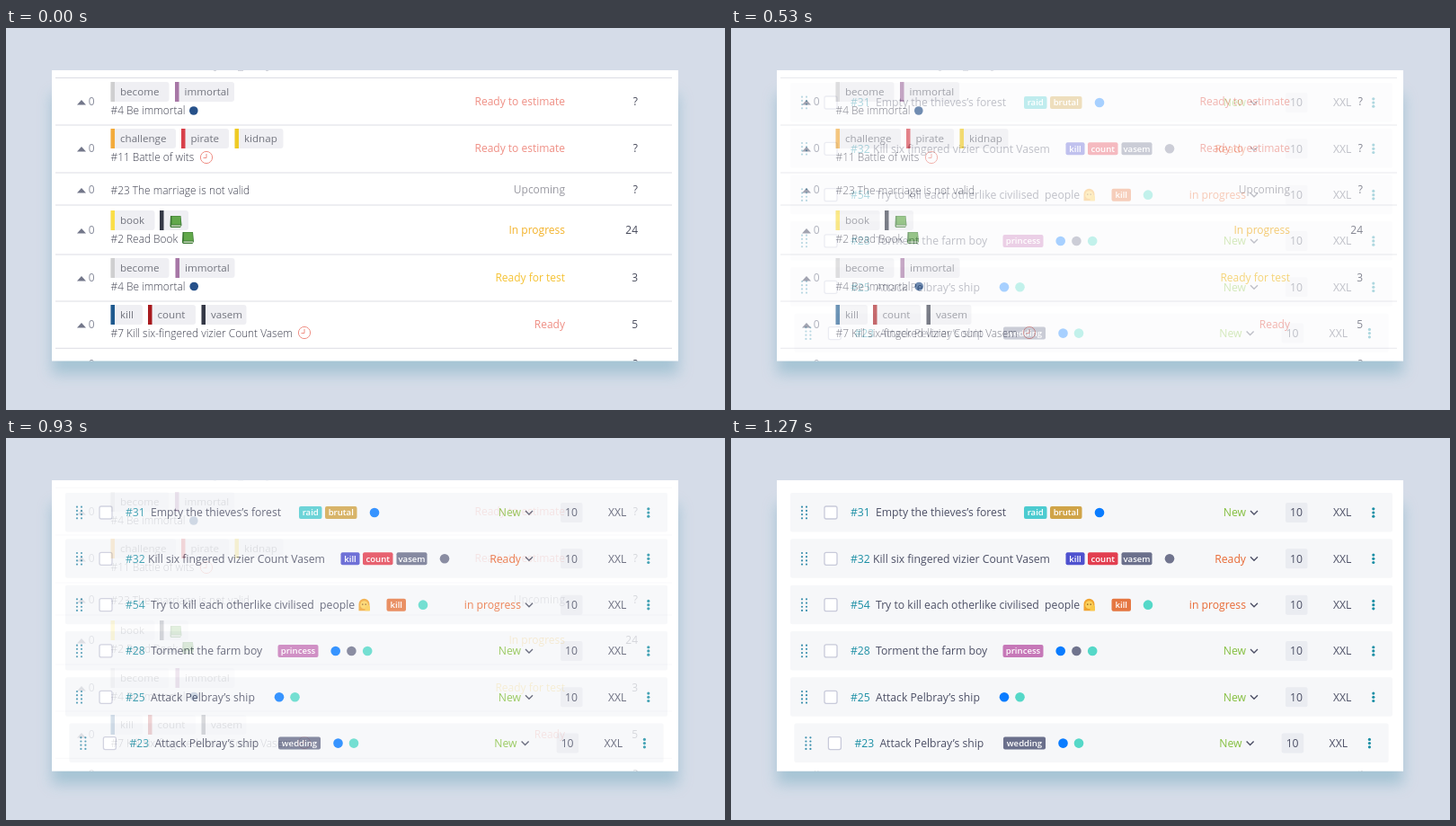
Animation, 800 px wide and 425 px high, one loop 5030 ms. Source, as an HTML page:

```html
<!DOCTYPE html>
<html lang="en">
<head>
<meta charset="utf-8">
<title>Backlog refresh</title>
<style>
  html, body { margin: 0; width: 100%; height: 100%; overflow: hidden; background: #d5dce8; }
  svg { display: block; width: 100%; height: 100%; font-family: "Open Sans", "Noto Sans", sans-serif; }
  .label { font-size: 11.6px; fill: #73757f; }
  .title { font-size: 11.9px; font-weight: 300; fill: #3f4150; }
  .state { font-size: 12px; }
  .story { font-size: 12.2px; fill: #4d5066; }
  .pill { font-size: 9.6px; font-weight: 600; fill: #fff; }
</style>
</head>
<body>
<svg viewBox="0 0 800 425">
  <defs>
    <filter id="soft" x="-10%" y="-20%" width="120%" height="140%"><feGaussianBlur stdDeviation="8"/></filter>
    <clipPath id="card"><rect x="51" y="47" width="697" height="323.5"/></clipPath>
  </defs>
  <rect width="800" height="425" fill="#d5dce8"/>
  <rect x="51" y="74" width="697" height="311" fill="#9cbfd0" opacity=".85" filter="url(#soft)"/>
  <g clip-path="url(#card)">
    <g id="before"></g>
    <g id="after"></g>
  </g>
</svg>
<script>
const LOOP = 5030, FADE_START = 30, FADE_END = 1270;
const CORAL = "#ef8f85", BLUE = "#0a7cff", GREY = "#70748e", TEAL = "#55d8c8",
      SLATE = "#6b708c", ORANGE = "#e86a35", GREEN = "#84bf3f", CYAN = "#1c8fa5";

const rect = (x, y, w, h, fill, r = 0, more = "") =>
  `<rect x="${x}" y="${y}" width="${w}" height="${h}" rx="${r}" fill="${fill}" ${more}/>`;
const dot = (x, y, r, fill) => `<circle cx="${x}" cy="${y}" r="${r}" fill="${fill}"/>`;
const path = (d, stroke, width = 1) =>
  `<path d="${d}" fill="none" stroke="${stroke}" stroke-width="${width}"/>`;
const text = (x, y, s, cls, fill, anchor = "start") =>
  `<text x="${x}" y="${y}" class="${cls}" text-anchor="${anchor}"${fill ? ` style="fill:${fill}"` : ""}>${s}</text>`;

const book = (x, y) =>
  `<g transform="translate(${x} ${y})">` +
  `<path d="M-6 -6H5.5L6.5 4.5L5 7H-5.5Q-7 6-6.5 4Z" fill="#3d7a35"/>` +
  `<path d="M-4.5 -5.5H5L5.5 3.5H-4.5Z" fill="#62a84b"/>` +
  path("M-5 5.2H5.5", "#e4ead8", 1.3) + `</g>`;

const clock = (x, y) =>
  `<circle cx="${x}" cy="${y}" r="6.6" fill="none" stroke="${CORAL}"/>` +
  path(`M${x} ${y - 4}V${y + .5}H${x - 3.5}`, CORAL);

const person = (x, y) =>
  `<path d="M${x - 6} ${y + 6.5}V${y - 1}a6 6 0 0 1 12 0V${y + 6.5}Z" fill="#f0a430"/>` +
  dot(x, y, 4.4, "#fcd25c") +
  path(`M${x - 2.5} ${y - .5}h1.5m2 0h1.5`, "#8a5a20", 1.1) +
  `<path d="M${x + 1} ${y + 6.5}V${y + 2}l4-2 1.5 2v4.5Z" fill="#fac94a"/>`;

// First view: [row centre, tags [x, width, colour, label], title, status, colour, points, marker]
const oldRows = [
  [82, [[116.5, 65, "#cfcfd0", "become"], [188, 66, "#a777a6", "immortal"]],
    "#4 Be immortal", "Ready to estimate", CORAL, "?", dot(208.8, 92, 4.8, "#26518a")],
  [134, [[116.5, 72.5, "#f3ab3c", "challenge"], [195, 53, "#d8404a", "pirate"], [254.5, 54, "#efcb25", "kidnap"]],
    "#11 Battle of wits", "Ready to estimate", CORAL, "?", clock(223, 144)],
  [180, [], "#23 The marriage is not valid", "Upcoming", "#9a9aa2", "?", ""],
  [225, [[116.5, 49, "#fade48", "book"], [171, 32, "#343846", ""]],
    "#2 Read Book", "In progress", "#f3b229", "24", book(189, 215) + book(202.5, 233)],
  [278, [[116.5, 65, "#cfcfd0", "become"], [188.5, 66, "#a777a6", "immortal"]],
    "#4 Be immortal", "Ready for test", "#f5c233", "3", dot(209.2, 287.5, 4.8, "#26518a")],
  [330, [[116.5, 35.5, "#1f5a8f", "kill"], [158, 53, "#a81a1e", "count"], [217.5, 50, "#343846", "vasem"]],
    "#7 Kill six-fingered vizier Count Vasem", "Ready", CORAL, "5", clock(332, 339)]
];

const vote = y => `<path d="M79 ${y + 3.5}l5-5.5 5 5.5Z" fill="#73778a"/>` +
  text(91.8, y + 4.3, "0", "state", "#8b8f9e");

const oldTag = y => ([x, w, color, label]) =>
  rect(x, y, w, 22, "#efeff3", 3) + rect(x, y, 4.5, 22, color) + text(x + 10.5, y + 14.8, label, "label");

function oldRow([y, tags, title, status, color, points, marker]) {
  return vote(y) + tags.map(oldTag(y - 22)).join("") +
    text(116.5, y + (tags.length ? 14 : 5), title, "title") + marker +
    text(622, y + 4.4, status, "state", color, "end") +
    text(703, y + 4.4, points, "state", "#474a5b", "end");
}

// Second view: [id, title, title x, tags, dots, status, colour]
const newRows = [
  ["#31", "Empty the thieves’s forest", 161,
    [[326, 25.5, "#4ccbd0", "raid"], [355, 35.5, "#d0a448", "brutal"]], [[410, BLUE]], "New", GREEN],
  ["#32", "Kill six fingered vizier Count Vasem", 158,
    [[372.5, 21, "#4f52cf", "kill"], [397, 33.5, "#e23f50", "count"], [434.5, 34, SLATE, "vasem"]],
    [[488, GREY]], "Ready", ORANGE],
  ["#54", "Try to kill each otherlike civilised&#160; people", 161,
    [[423.5, 21.5, "#e57742", "kill"]], [[464, TEAL]], "in progress", ORANGE],
  ["#28", "Torment the farm boy", 161,
    [[302.5, 45, "#c678b8", "princess"]], [[366.7, BLUE], [384.4, GREY], [402.2, TEAL]], "New", GREEN],
  ["#25", "Attack Pelbray’s ship", 161, [], [[304, BLUE], [321.5, TEAL]], "New", GREEN],
  ["#23", "Attack Pelbray’s ship", 161,
    [[303, 47, SLATE, "wedding"]], [[369.5, BLUE], [387, TEAL]], "New", GREEN]
];

const pill = y => ([x, w, color, label]) =>
  rect(x, y - 7, w, 14, color, 2) + text(x + w / 2, y + 3.4, label, "pill", "", "middle");

function grip(x, y) {
  let out = "";
  for (let i = 0; i < 8; i++) out += dot(x + i % 2 * 5, y - 6.3 + (i >> 1) * 4.2, 1.1, "#3a8fad");
  return out;
}

function newRow([id, title, titleX, tags, dots, status, color], i) {
  const y = 83 + i * 51.32, inset = i === 5 ? 4.4 : 0, right = 736 - inset;
  const base = y + 4.3;
  return rect(66 + inset, y - 22, 670 - 2 * inset, 43.5, "#f6f7f9", 2) +
    grip(79 + inset, y) +
    rect(104 + inset, y - 7, 14, 14, "#fff", 2, 'stroke="#c8cada" stroke-width="1.3"') +
    text(133 + inset, base, id, "story", CYAN) +
    text(titleX + inset, base, title, "story") +
    tags.map(pill(y)).join("") +
    dots.map(([x, c]) => dot(x, y, 5.3, c)).join("") +
    (i === 2 ? person(398.5, y) : "") +
    text(right - 163, base, status, "story", color, "end") +
    path(`M${right - 158} ${y - 2}l4 4 4-4`, "#4d5066", 1.4) +
    rect(right - 119, y - 11, 24.5, 22, "#eaecf1", 2) +
    text(right - 107, base, "10", "story", "", "middle") +
    text(right - 66, base, "XXL", "story") +
    [-4.2, 0, 4.2].map(d => dot(right - 21.2, y + d, 1.6, CYAN)).join("");
}

const backdrop = rect(51, 47, 697, 324, "#fff");
const before = document.getElementById("before"), after = document.getElementById("after");

before.innerHTML = backdrop +
  [55.5, 108, 161, 197, 252, 304, 356.3].map(y => path(`M55 ${y}H741`, "#dcdde4")).join("") +
  path("M231 47.3h3m24 0h6m25 0h3", "#c9cad2") +
  oldRows.map(oldRow).join("") +
  text(91.8, 378, "0", "state", "#8b8f9e") + text(703, 378, "?", "state", "#474a5b", "end");
after.innerHTML = backdrop + newRows.map(newRow).join("");

function draw(time) {
  const t = time % LOOP;
  const p = Math.min(1, Math.max(0, (t - FADE_START) / (FADE_END - FADE_START)));
  after.setAttribute("opacity", p * p * (3 - 2 * p));
}

const start = performance.now();
function tick() {
  draw(performance.now() - start);
  requestAnimationFrame(tick);
}
draw(0);
requestAnimationFrame(tick);
</script>
</body>
</html>
```
